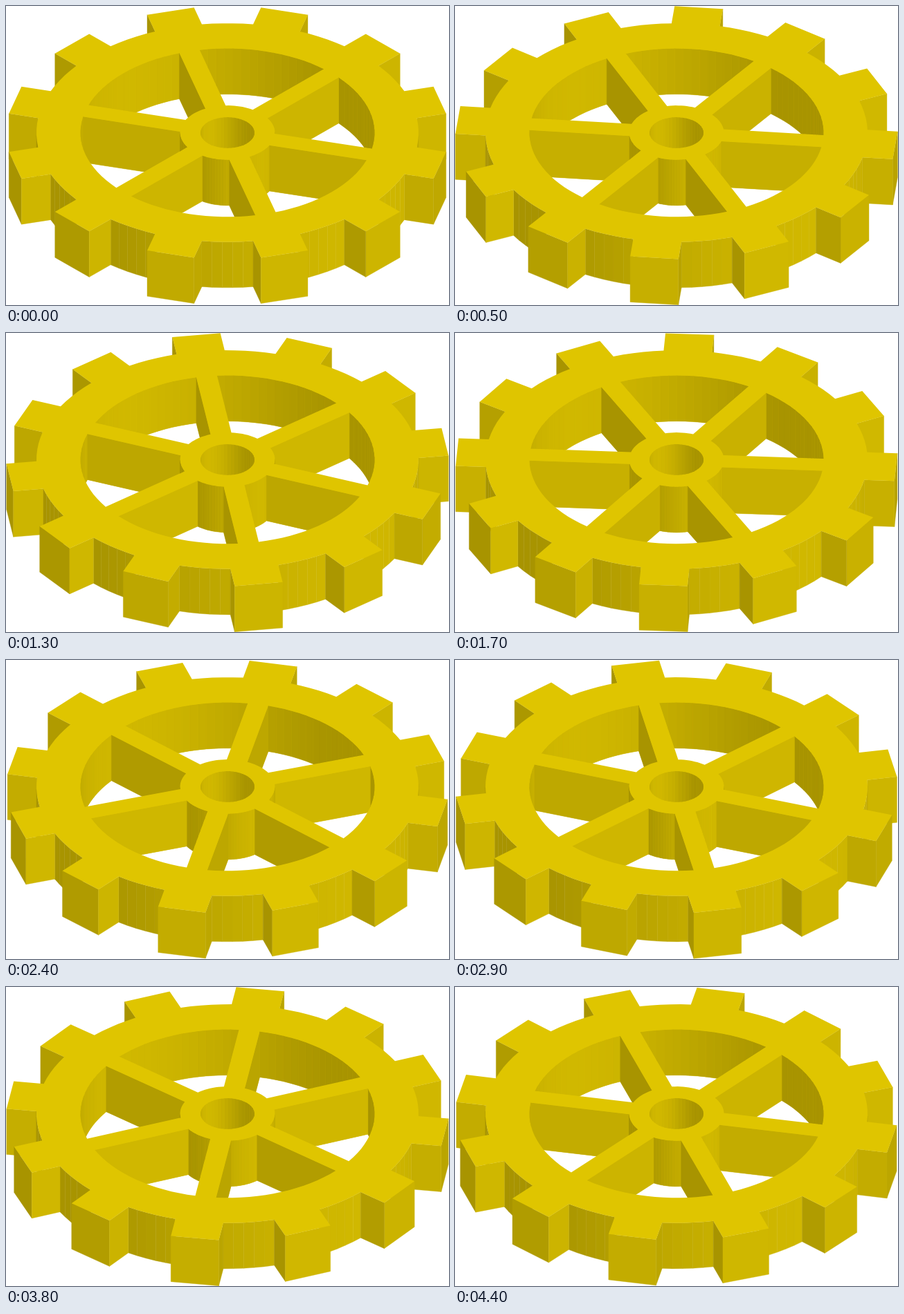
Animation of 640 by 433 pixels, one loop 4.5 s. Source, as an HTML page with a canvas:

```html
<!DOCTYPE html>
<html lang="en">
<head>
<meta charset="utf-8">
<title>Rotating gear</title>
<style>
html, body { margin: 0; width: 100%; height: 100%; overflow: hidden; background: #fff; }
canvas { display: block; }
</style>
</head>
<body>
<canvas id="stage" width="640" height="433"></canvas>
<script>
const ctx = document.getElementById('stage').getContext('2d');
const LOOP = 4500, STEP = 100;
const CX = 320, CY = 183.4, TILT = 0.5736, DEPTH = 66.2;
const RIM = 276, INNER = 212.5, HUB = 68.5, BORE = 39, TIP = 317.5;
const TOOTH = 35, SPOKE = 15.2;
const RAD = Math.PI / 180;

// [step, degrees]: the speed of the wheel is slightly uneven
const turn = [[0, 15], [5, 5.8], [13, -38.15], [17, -56.57], [24, -78], [33, -119], [44, -168.4]];

const polar = (r, a) => [r * Math.cos(a), r * Math.sin(a)];

function arc(r, from, to, parts) {
  return Array.from({ length: parts + 1 }, (_, i) => polar(r, from + (to - from) * i / parts));
}

function outerShape() {
  const half = Math.asin(TOOTH / RIM), tip = Math.hypot(TIP, TOOTH), tipHalf = Math.atan(TOOTH / TIP);
  const pts = [];
  for (let i = 0; i < 12; i++) {
    const a = i * 30 * RAD;
    pts.push(polar(tip, a - tipHalf), polar(tip, a + tipHalf));
    pts.push(...arc(RIM, a + half, a + 30 * RAD - half, 5));
  }
  return pts;
}

function windowShape(i) {
  const a = i * 60 * RAD, b = a + 60 * RAD;
  const rim = Math.asin(SPOKE / INNER), hub = Math.asin(SPOKE / HUB);
  return [...arc(INNER, b - rim, a + rim, 16), ...arc(HUB, a + hub, b - hub, 10)];
}

const outer = outerShape();
const holes = [0, 1, 2, 3, 4, 5].map(windowShape);
holes.push(arc(BORE, 2 * Math.PI, 0, 48).slice(0, -1));

function angleAt(step) {
  let i = 0;
  while (i < turn.length - 2 && step > turn[i + 1][0]) i++;
  const [s0, a0] = turn[i], [s1, a1] = turn[i + 1];
  return (a0 + (a1 - a0) * (step - s0) / (s1 - s0)) * RAD;
}

function project(pts, rot) {
  const c = Math.cos(rot), s = Math.sin(rot);
  return pts.map(([x, y]) => [CX + x * c - y * s, CY + (x * s + y * c) * TILT]);
}

function trace(pts, dy = 0) {
  ctx.beginPath();
  pts.forEach(([x, y], i) => i ? ctx.lineTo(x, y + dy) : ctx.moveTo(x, y + dy));
  ctx.closePath();
}

// Round walls (short facets) are lit from a little further right than flat ones
function shade(normal, round) {
  const lamp = (round ? 46 : 62) * RAD;
  const light = Math.max(0, Math.cos(normal - lamp)) ** 1.5;
  const red = 168 + 40 * light;
  return `rgb(${Math.round(red)},${Math.round(red * 0.883)},0)`;
}

// Only walls turned towards the viewer, far ones first
function walls(pts) {
  const list = [];
  pts.forEach((p, i) => {
    const q = pts[(i + 1) % pts.length];
    const dx = q[0] - p[0], dy = (q[1] - p[1]) / TILT;
    if (dx < -0.01) {
      list.push({ p, q, y: p[1] + q[1], color: shade(Math.atan2(-dx, dy), Math.hypot(dx, dy) < 25) });
    }
  });
  list.sort((a, b) => a.y - b.y);
  ctx.lineWidth = 0.4;
  ctx.lineJoin = 'round';
  for (const { p, q, color } of list) {
    trace([p, q, [q[0], q[1] + DEPTH], [p[0], p[1] + DEPTH]]);
    ctx.fillStyle = ctx.strokeStyle = color;
    ctx.fill();
    ctx.stroke();
  }
}

function draw(step) {
  const rot = angleAt(step);
  ctx.fillStyle = '#fff';
  ctx.fillRect(0, 0, 640, 433);

  const rim = project(outer, rot);
  walls(rim);
  trace(rim);
  ctx.fillStyle = '#dfc500';
  ctx.fill();

  for (const hole of holes) {
    const pts = project(hole, rot);
    ctx.save();
    trace(pts);
    ctx.clip();
    trace(pts, DEPTH);
    ctx.fillStyle = '#fff';
    ctx.fill();
    walls(pts);
    ctx.restore();
  }
}

const start = performance.now();
function tick() {
  const t = Math.max(0, performance.now() - start) % LOOP;
  draw(Math.floor(t / STEP));
  requestAnimationFrame(tick);
}
tick();
</script>
</body>
</html>
```
